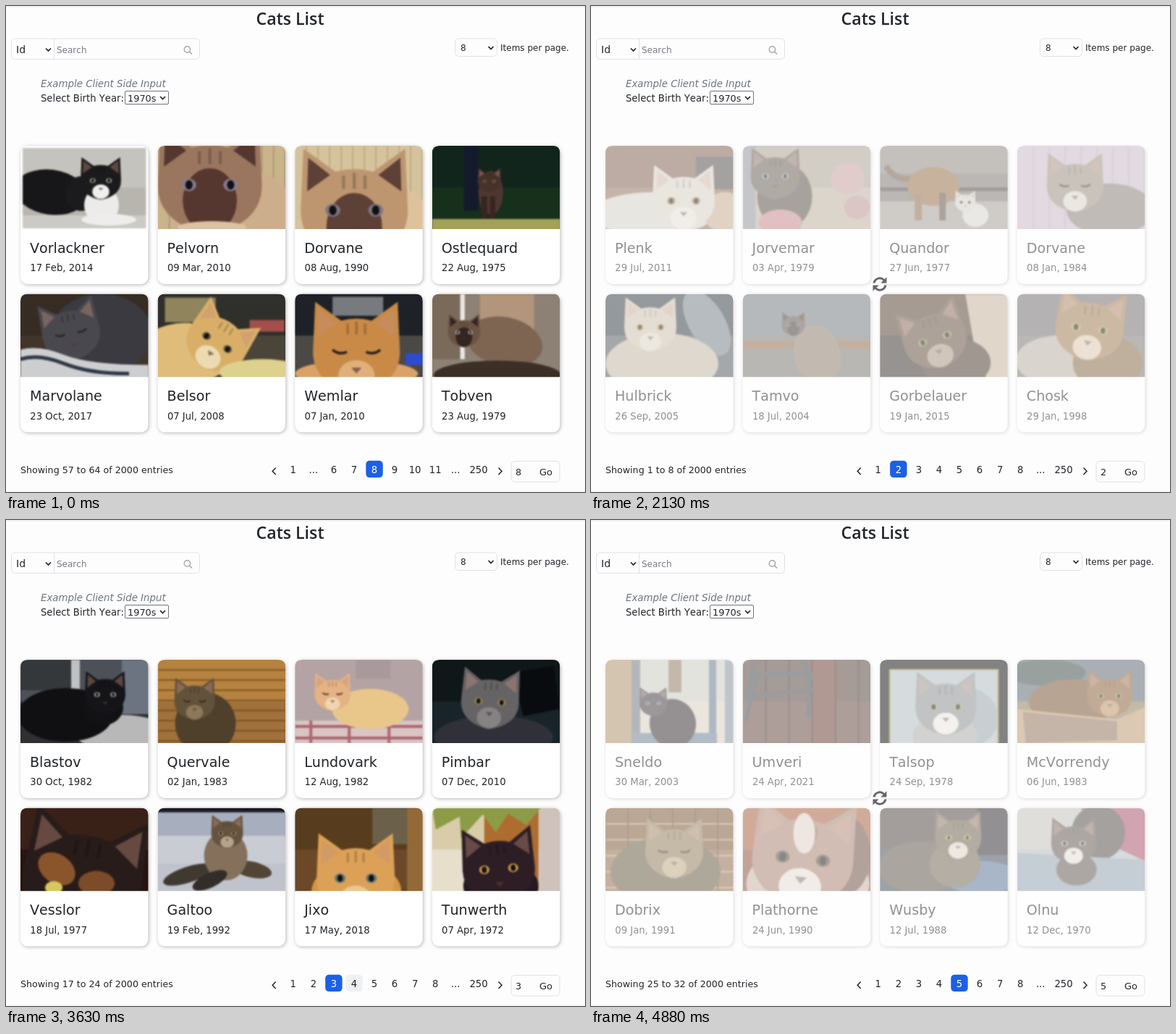
An HTML page that plays this animation: 800x671 px, repeating every 5.01 s.

```html
<!DOCTYPE html>
<html lang="en">
<head>
<meta charset="utf-8">
<title>Cats List</title>
<style>
html, body { margin: 0; width: 100%; height: 100%; overflow: hidden; background: #fefdfe; }
svg { display: block; width: 800px; height: 671px; font: 13.2px "DejaVu Sans", sans-serif; font-kerning: none; fill: #212529; }
.line { fill: #fefdfe; stroke: #dee2e6; }
.icon { fill: none; stroke: #212529; stroke-width: 1.7; }
.card { fill: #fff; filter: drop-shadow(1.5px 1.5px 2.5px rgba(0, 0, 0, .28)); }
.art { filter: blur(1.1px); }
.name { font-size: 19.1px; }
.small { font-size: 12px; }
.mid { text-anchor: middle; }
</style>
</head>
<body>
<svg viewBox="0 0 800 671" xmlns="http://www.w3.org/2000/svg">
  <defs><clipPath id="photo"><path d="M0 115V10Q0 0 10 0H166.5Q176.5 0 176.5 10V115Z"/></clipPath></defs>
  <rect width="800" height="671" fill="#fefdfe"/>
  <rect width="800" height="2" fill="#eff0f4"/>
  <rect y="669" width="800" height="2" fill="#fcf7f4"/>
  <text x="392.5" y="26" class="mid" style="font:600 23.2px 'Open Sans',sans-serif">Cats List</text>

  <rect class="line" x="7.5" y="45" width="260" height="28.5" rx="5"/>
  <path class="line" d="M66.5 45V73"/>
  <text x="14" y="65" font-size="14">Id</text>
  <path class="icon" d="M55 58.5l3.5 3.5l3.5-3.5"/>
  <text x="70" y="64.5" class="small" fill="#767a80">Search</text>
  <path class="icon" style="stroke:#a4a4a8;stroke-width:1.4" d="M254.6 60a4.2 4.2 0 1 0-8.4 0a4.2 4.2 0 1 0 8.4 0M253.4 63l3.6 3.6"/>

  <rect class="line" x="620.5" y="45" width="58" height="24.5" rx="5"/>
  <text x="628" y="62" class="small">8</text>
  <path class="icon" d="M666.5 56l3.5 3.5l3.5-3.5"/>
  <text x="683" y="62" class="small">Items per page.</text>

  <text x="48" y="112" font-style="italic" fill="#6c757d" font-size="13.35">Example Client Side Input</text>
  <text x="48" y="132">Select Birth Year:</text>
  <rect x="164.5" y="117.5" width="60" height="18" rx="1.5" fill="#fff" stroke="#70747a"/>
  <text x="168" y="132" font-size="12.9">1970s</text>
  <path class="icon" d="M213 125l3.5 3.5l3.5-3.5"/>

  <g id="cards"></g>
  <g id="spin" fill="#69666a"></g>

  <text id="info" x="20" y="644.7" font-size="12.65"></text>
  <path id="prev" class="icon" style="stroke-width:1.5" d="M372.7 637.5l-4.5 4.7l4.5 4.7"/>
  <path class="icon" style="stroke-width:1.5" d="M680.5 637.5l4.5 4.7l-4.5 4.7"/>
  <rect id="hover" y="627.7" width="23.4" height="23.4" rx="5" fill="#eff0f2"/>
  <rect id="mark" y="627.7" width="23.4" height="23.4" rx="5" fill="#1c60e6"/>
  <g id="pager" class="mid"></g>
  <rect class="line" x="698" y="628.5" width="67" height="28.5" rx="5"/>
  <text id="goto" x="704" y="648" font-size="12.8"></text>
  <text x="737" y="648" font-size="13">Go</text>
</svg>
<script>
const $ = id => document.getElementById(id);
const TICK = 125, LOOP = 5010;

// Small drawing kit; photos are 177 by 115
const box = (x, y, w, h, c) => `<rect x="${x}" y="${y}" width="${w}" height="${h}" fill="${c}"/>`;
const oval = (x, y, rx, ry, c, turn = 0) =>
  `<ellipse rx="${rx}" ry="${ry}" fill="${c}" transform="translate(${x} ${y}) rotate(${turn})"/>`;
const shape = (d, c) => `<path d="${d}" fill="${c}"/>`;
const line = (d, c, w) => `<path d="${d}" fill="none" stroke="${c}" stroke-width="${w}"/>`;
const bg = (...c) => box(-9, -9, 195, 133, c[0]) +
  c.map((k, i) => box(-9, i * 115 / c.length, 195, 133, k)).join('');
const slats = (step, c, down) => {
  let d = '';
  for (let p = step; p < 177; p += step) d += down ? `M${p} 0V115` : `M0 ${p}H177`;
  return line(d, c, 1.5);
};

// Head with ears; eye '' means closed eyes, mask darkens ears and face
function head(x, y, s, c, eye = '', chin = '', turn = 0, mask = '') {
  const lids = line('M-.55-.05Q-.4.08-.22 0M.22 0Q.4.08.55-.05', '#30211c', .06);
  const eyes = eye ? [-.4, .4].map(k => oval(k, 0, .14, .12, eye) + oval(k, 0, .07, .09, '#111')).join('') : lids;
  return `<g transform="translate(${x} ${y}) rotate(${turn}) scale(${s})">` +
    shape('M-1 0L-.95-1.15L-.35-.72Q0-.82.35-.72L.95-1.15L1 0Q1 .75 0 .95Q-1 .75-1 0Z', c) +
    shape('M-.88-.35L-.86-.98L-.45-.66ZM.88-.35L.86-.98L.45-.66Z', mask || '#c4907a66') +
    line('M-.2-.65V-.4M0-.7V-.4M.2-.65V-.4', '#0003', .06) +
    (mask ? oval(0, .3, .52, .62, mask) : '') +
    (chin ? oval(0, .55, .42, .36, chin) : '') + eyes +
    shape('M-.12.36H.12L0 .5Z', '#5a3833aa') + '</g>';
}

const pages = [
  { info: '57 to 64', cards: [
    ['Vorlackner', '17 Feb, 2014', bg('#c5c3bd', '#b7b5ae') + box(0, 96, 177, 19, '#cbcac4') +
      oval(42, 64, 50, 31, '#17171a', 8) + oval(84, 66, 22, 24, '#1b1b1d') + oval(112, 82, 24, 26, '#ecebea') +
      oval(122, 102, 38, 8, '#eeedeb') + head(111, 48, 28, '#1b1b1d', '#9aa28c', '#f1efee') +
      '<rect x="1" y="1" width="174.5" height="115" fill="none" stroke="#fff" stroke-width="4"/>'],
    ['Pelvorn', '09 Mar, 2010', bg('#c9b48c') + slats(16, '#a8916c', 1) + oval(105, 92, 85, 62, '#cdae8c') +
      head(72, 54, 72, '#9b765f', '#867b90', '', 0, '#55372f') + oval(75, 113, 48, 9, '#dbc2a5')],
    ['Dorvane', '08 Aug, 1990', bg('#d5c39d') + slats(16, '#b8a57e', 1) + oval(135, 112, 55, 55, '#dec29c') +
      head(82, 89, 74, '#bd9670', '#7f7482', '', 0, '#5d4036')],
    ['Ostlequard', '22 Aug, 1975', bg('#12251d', '#16301c') + box(44, 0, 20, 90, '#141a2c') +
      oval(81, 65, 17, 30, '#4d3730') + box(68, 70, 8, 33, '#38251f') + box(80, 70, 7, 33, '#38251f') +
      head(79, 49, 16, '#47322b', '#a39353') + box(0, 101, 177, 20, '#a2a256')],
    ['Marvolane', '23 Oct, 2017', bg('#372c23', '#40352b') + oval(112, 55, 70, 55, '#3a3a40') +
      head(70, 54, 40, '#48484e', '', '', -12) + shape('M0 77Q25 70 60 84T177 98V125H0Z', '#cdced0') +
      line('M0 90Q25 82 60 96T150 110', '#303849', 5)],
    ['Belsor', '07 Jul, 2008', bg('#2f2f2c', '#4a4538') + box(10, 5, 70, 34, '#8f845c') + box(127, 36, 48, 16, '#a44e4c') +
      oval(38, 82, 65, 42, '#dfbc7a') + head(82, 67, 43, '#d9af68', '#5b5440', '#ecdbb2', 32) + oval(145, 108, 60, 18, '#ded08d')],
    ['Wemlar', '07 Jan, 2010', bg('#1e2127', '#4b4946') + box(52, 4, 70, 26, '#777b7d') + box(153, 82, 24, 16, '#2d4bd0') +
      oval(85, 110, 85, 18, '#d9a267') + head(85, 80, 60, '#c98a48', '', '#dfb07a')],
    ['Tobven', '23 Aug, 1979', bg('#8d8074') + box(0, 0, 38, 90, '#7a6a59') + box(39, 0, 6, 90, '#ece9e4') +
      box(66, 0, 75, 70, '#b2957a') + oval(100, 66, 53, 34, '#7e6552', 12) +
      head(44, 53, 22, '#6a5342', '#c3ced3', '', 0, '#33251f') + oval(90, 112, 88, 20, '#3b3027')]
  ] },
  { info: '1 to 8', cards: [
    ['Plenk', '29 Jul, 2011', bg('#7c5a49', '#8b6a55') + box(125, 15, 52, 45, '#4b4644') + oval(65, 94, 85, 30, '#d3cec5') +
      oval(165, 92, 30, 28, '#c2a98a') + head(108, 76, 43, '#d5cec2', '#a87f45', '#e4dfd6')],
    ['Jorvemar', '03 Apr, 1979', bg('#a69c8c', '#b9ad9b') + box(0, 0, 18, 115, '#8d8f94') + oval(145, 45, 24, 22, '#c39a98') +
      oval(158, 85, 18, 16, '#b98d8d') + oval(58, 70, 38, 45, '#51473d') + head(45, 42, 34, '#62564a', '#8ba0a8') + oval(52, 106, 30, 18, '#c28287')],
    ['Quandor', '27 Jun, 1977', bg('#8a857d', '#77716a', '#a19b92') + line('M0 60H177', '#423d38', 5) +
      line('M48 45Q22 50 8 28', '#6e5138', 8) + oval(74, 56, 36, 27, '#91673e') + box(48, 65, 10, 38, '#87633f') +
      box(82, 65, 9, 38, '#5a4639') + oval(132, 96, 18, 16, '#d7d2cb') + head(118, 78, 14, '#d3cdc4', '#333')],
    ['Dorvane', '08 Jan, 1984', bg('#c6b5c5') + slats(22, '#b19db1', 1) + oval(128, 88, 60, 36, '#82796e') +
      head(80, 55, 39, '#95897b', '', '#d9d0c5')],
    ['Hulbrick', '26 Sep, 2005', bg('#2b343c', '#4c5357') + oval(140, 40, 25, 50, '#6f7b82', -30) + oval(78, 96, 78, 42, '#beb29f') +
      head(62, 46, 36, '#cbbda8', '#c18c2e', '#dad0c1')],
    ['Tamvo', '18 Jul, 2004', bg('#6c757b', '#757169') + box(0, 66, 177, 9, '#8d5f3d') + oval(103, 84, 32, 42, '#877765', -12) +
      head(70, 43, 16, '#5b4c42', '#8fa9bc', '', 0, '#372e2b')],
    ['Gorbelauer', '19 Jan, 2015', bg('#4c3827', '#2f2822') + shape('M118 0H180V125H150L130 70Z', '#c2b097') +
      oval(105, 95, 48, 34, '#423123') + head(76, 62, 44, '#5d4634', '#8b8b47', '#a58f78', -18)],
    ['Chosk', '29 Jan, 1998', bg('#6a6766', '#777270') + oval(60, 92, 62, 35, '#b5aa9d') + oval(125, 95, 48, 38, '#80603c') +
      head(100, 48, 47, '#9b7548', '#aca14b', '#dbc5a9', 8)]
  ] },
  { info: '9 to 16', cards: [
    ['Farvost', '04 Jan, 1992', bg('#686760', '#77736b') + oval(64, 83, 72, 35, '#a9a59b') + oval(118, 85, 32, 35, '#b7b2a8') +
      head(111, 44, 33, '#aaa498', '#827c50', '#ccc7bd')],
    ['Zumra', '27 Aug, 2003', bg('#c9c4bc', '#d9d7d1') + box(120, 0, 57, 28, '#4a5b6e') + box(162, 30, 14, 26, '#92979c') +
      oval(55, 62, 52, 22, '#efebe3') + head(92, 48, 25, '#ede5d7', '#86836b') + shape('M65 70L118 64L128 90L60 88Z', '#a58a83') +
      shape('M0 83L180 108V125H0Z', '#33302f')],
    ['Moldwyn', '28 May, 2004', bg('#68747b', '#887e74') + line('M72 46Q40 75 28 60Q4 48 12 34', '#ad7646', 11) +
      oval(108, 52, 50, 31, '#d9d0c5') + oval(86, 42, 28, 20, '#b68252') + box(80, 70, 12, 43, '#ddd2c7') +
      box(125, 70, 14, 45, '#ddd2c7') + head(145, 40, 30, '#b98458', '#777447', '#eadfd4')],
    ['Orquil', '25 Mar, 1974', bg('#526475', '#8394a4') + oval(92, 110, 62, 38, '#8d8072') + head(91, 73, 60, '#796858', '#6e846f', '#cec1b4')],
    ['Nulk', '27 Dec, 2004', bg('#8a7759', '#566b86') + oval(105, 108, 52, 35, '#a39582') + head(100, 65, 52, '#83705d', '#7b876d', '#ccbeae', 0)],
    ['Fromp', '09 Oct, 1987', bg('#b67428', '#955820') + box(0, 15, 48, 90, '#65401f') + box(95, 10, 82, 35, '#d09b55') +
      head(98, 80, 64, '#1d1714', '#a56c26', '', 5)],
    ['Drovenhurst', '13 Jan, 1974', bg('#3c4b2c', '#616549') + slats(13, '#56633e', 1) + oval(94, 68, 45, 34, '#ddd3c6') +
      oval(112, 52, 26, 22, '#c2783d') + head(63, 53, 27, '#c1834d', '#777a44', '#eee6dc')],
    ['Kelvop', '17 Dec, 2006', bg('#3d4143', '#282a2b') + box(0, 0, 36, 80, '#65696b') + box(125, 0, 52, 40, '#747576') +
      oval(72, 68, 68, 43, '#141415') + oval(130, 70, 35, 42, '#151516') + head(124, 40, 32, '#19191a', '#7f7c62') + oval(105, 113, 90, 17, '#c5c4c1')]
  ] },
  { info: '17 to 24', cards: [
    ['Blastov', '30 Oct, 1982', bg('#4c5157', '#2e3032') + box(0, 0, 70, 42, '#34383b') + box(70, 0, 12, 40, '#bfc1c3') + box(140, 0, 40, 75, '#6b7480') +
      oval(140, 101, 65, 25, '#b8b8b8') + oval(62, 76, 66, 37, '#101013') + oval(115, 66, 27, 24, '#121215') + head(117, 48, 28, '#151519', '#9ba69b')],
    ['Quervale', '02 Jan, 1983', bg('#b5833f', '#a0713a') + slats(14, '#70491d') + oval(66, 88, 42, 43, '#4e402b') +
      head(51, 57, 28, '#62523a', '', '#8b795a')],
    ['Lundovark', '12 Aug, 1982', bg('#b3a3a4') + box(84, 0, 48, 26, '#aa999c') + box(0, 84, 177, 35, '#d8c5c4') +
      line('M0 92H177M0 108H177M22 84V115M75 84V115M130 84V115', '#ad6470', 4) + oval(104, 68, 53, 28, '#e9c78b') + head(52, 47, 25, '#e4b283', '', '#f0d5ae')],
    ['Pimbar', '07 Dec, 2010', bg('#101719', '#182429') + shape('M110 18L168 8L176 68L126 78Z', '#080c0f') +
      oval(85, 107, 82, 30, '#303039') + head(80, 58, 40, '#666365', '#98864b', '#858283', 4)],
    ['Vesslor', '18 Jul, 1977', bg('#3a2118', '#26150f') + head(85, 100, 82, '#281c1a', '', '', 10) +
      oval(50, 84, 28, 20, '#8a552a', 35) + oval(105, 104, 25, 17, '#7c4b29') + oval(46, 110, 12, 9, '#d9c75f')],
    ['Galtoo', '19 Feb, 1992', bg('#a7afbf', '#c9ccd3', '#c1c3cc') + box(-9, -9, 195, 15, '#1a1b20') + oval(42, 92, 36, 11, '#403930', -18) +
      oval(130, 85, 28, 11, '#514536', 12) + oval(94, 66, 30, 34, '#85705c') + oval(72, 100, 26, 10, '#332d29', -25) +
      head(96, 35, 22, '#65533f', '#a7a069', '#b6a48a')],
    ['Jixo', '17 May, 2018', bg('#573d1d', '#6b4928') + box(107, 0, 48, 50, '#6b604a') + box(155, 0, 25, 125, '#936a37') +
      oval(85, 115, 62, 40, '#d39646') + head(84, 97, 54, '#dca157', '#63777b', '#eac792')],
    ['Tunwerth', '07 Apr, 1972', bg('#d9cda9', '#e7decc') + box(72, 4, 75, 111, '#ae6c31') + box(148, 0, 35, 125, '#cfc2bc') +
      shape('M0 0H150L130 24L105 8L88 34L70 9L40 42L38 12L5 30Z', '#8c9b46') + oval(95, 108, 52, 35, '#241a21') +
      head(92, 84, 50, '#2c1e24', '#d19a4c', '', -4)]
  ] },
  { info: '25 to 32', cards: [
    ['Sneldo', '30 Mar, 2003', bg('#c8c8bd', '#d7cebd') + box(-9, -9, 45, 133, '#aa8c63') + box(36, 0, 12, 115, '#68707a') +
      box(87, 0, 18, 45, '#8b7358') + box(143, 0, 10, 115, '#5d7388') + box(165, 0, 20, 125, '#818d97') + box(36, 101, 118, 20, '#657b8e') +
      oval(93, 88, 32, 34, '#2c2429', -12) + head(66, 60, 19, '#3a3037', '#a5b9c1')],
    ['Umveri', '24 Apr, 2021', bg('#4c3830', '#5c3e34') + box(95, 0, 35, 125, '#643529') + slats(32, '#271c1a', 1) +
      line('M18 0L6 50M85 0L94 42L6 51M16 20H94L90 80M20 20L4 84', '#343d45', 5)],
    ['Talsop', '24 Sep, 1978', bg('#060606') + box(14, 15, 148, 110, '#aeb9bd') + oval(118, 80, 45, 42, '#91a0a8') +
      line('M14 115V14H163V115', '#b5a054', 2) + oval(90, 105, 45, 27, '#a6a7a4') + head(91, 65, 42, '#85898a', '#929d5f', '#eae5e0')],
    ['McVorrendy', '06 Jun, 1983', bg('#55616a', '#8c7553') + oval(40, 18, 55, 18, '#344540') + oval(78, 58, 62, 31, '#714a29') +
      head(128, 50, 31, '#84572f', '#98924f', '#b98c5d') + shape('M0 68L138 82L180 64V125H0Z', '#b99568') + shape('M8 72L138 85V111L12 115Z', '#8c6a52')],
    ['Dobrix', '09 Jan, 1991', bg('#76502f', '#8b633e') + slats(22, '#c8b184') + slats(31, '#5d3923', 1) + oval(83, 88, 76, 48, '#5f5238') +
      head(95, 60, 40, '#8b7650', '', '#b8a57d')],
    ['Plathorne', '24 Jun, 1990', bg('#a45936', '#874830') + oval(90, 105, 85, 55, '#c7afa1') + oval(140, 65, 37, 55, '#674639') +
      head(83, 70, 70, '#a47d68', '#4f4130', '#e7dbd2', 6) + oval(85, 35, 15, 28, '#ded0c5')],
    ['Wusby', '12 Jul, 1988', bg('#493d3b', '#3b4556') + box(135, 0, 42, 65, '#292328') + oval(140, 96, 52, 23, '#526f92') +
      oval(57, 82, 60, 36, '#574d40') + oval(104, 78, 35, 32, '#6b5e4d') + head(108, 41, 32, '#675a46', '#c2ad5c', '#ddd3c4')],
    ['Olnu', '12 Dec, 1970', bg('#c0bfb8', '#afb8c0') + shape('M88 0H180V75L110 42Z', '#a74863') + oval(112, 34, 37, 38, '#4b4541') +
      shape('M0 62L180 72V125H0Z', '#8d9dac') + oval(82, 85, 28, 22, '#5c5148') + head(78, 49, 31, '#5d5148', '#a7b2a4', '#e5ded7')]
  ] }
];

$('cards').innerHTML = pages.map(p => '<g>' + p.cards.map(([name, date, art], i) =>
  `<g transform="translate(${20 + i % 4 * 189.6} ${i < 4 ? 193 : 397.6})">
    <rect class="card" width="176.5" height="191" rx="10"/>
    <g clip-path="url(#photo)"><g class="art">${art}</g></g>
    <text class="name" x="13" y="147.5">${name}</text><text x="13.3" y="173">${date}</text></g>`).join('') + '</g>').join('');

const arrow = '<path d="M-9.5-1.5A9.5 9.5 0 0 1 6.6-6.8L9.5-9.7V-1.5H1.3L4.6-4.8A6.4 6.4 0 0 0-6.3-1.5Z"/>';
$('spin').innerHTML = arrow + `<g transform="rotate(180)">${arrow}</g>`;

// Each click: time, page, time the answer arrives, card set, first spinner angle
const clicks = [
  [1130, 1, 1630, 1, 25], [2130, 2, 2630, 2, 0], [3130, 3, 3630, 3, 25],
  [4000, 4, 4380, 4, 0], [4630, 5, LOOP, 4, -45]
];
const hovers = [[750, 1], [1750, 2], [2630, 3], [3505, 4], [4500, 5]];
const slot = i => 396.8 + i * 28.05;

function draw(t) {
  let page = 8, set = 0, load = null;
  for (const c of clicks) if (t >= c[0]) {
    page = c[1];
    load = t < c[2] ? c : null;
    if (!load) set = c[3];
  }
  [...$('cards').children].forEach((g, i) => g.style.display = i === set ? '' : 'none');
  $('cards').setAttribute('opacity', load ? .5 : 1);
  $('spin').style.display = load ? '' : 'none';
  if (load) {
    const n = Math.floor((t - load[0] + 10) / TICK);
    $('spin').setAttribute('transform', `translate(399 384) rotate(${load[4] + n * 22.5})`);
  }

  const labels = page > 5 ? [1, '...', 6, 7, 8, 9, 10, 11] : [1, 2, 3, 4, 5, 6, 7, 8];
  const at = labels.indexOf(page);
  $('pager').innerHTML = labels.map((s, i) =>
    `<text x="${slot(i)}" y="644.7" fill="${i === at ? '#fff' : '#212529'}">${s}</text>`).join('') +
    `<text x="${slot(8)}" y="644.7">...</text><text x="653" y="644.7">250</text>`;
  $('mark').setAttribute('x', slot(at) - 11.7);
  $('prev').style.stroke = page === 1 ? '#a0a2a5' : '';
  $('info').textContent = `Showing ${pages[set].info} of 2000 entries`;
  $('goto').textContent = page;

  const h = hovers.filter(v => t >= v[0]).pop();
  const on = h && h[1] !== page;
  $('hover').setAttribute('opacity', on ? (t - h[0] < TICK ? .5 : 1) : 0);
  if (on) $('hover').setAttribute('x', slot(h[1] - 1) - 11.7);
}

let start;
function frame(now) {
  start ??= now;
  draw((now - start) % LOOP);
  requestAnimationFrame(frame);
}
draw(0);
requestAnimationFrame(frame);
</script>
</body>
</html>
```
